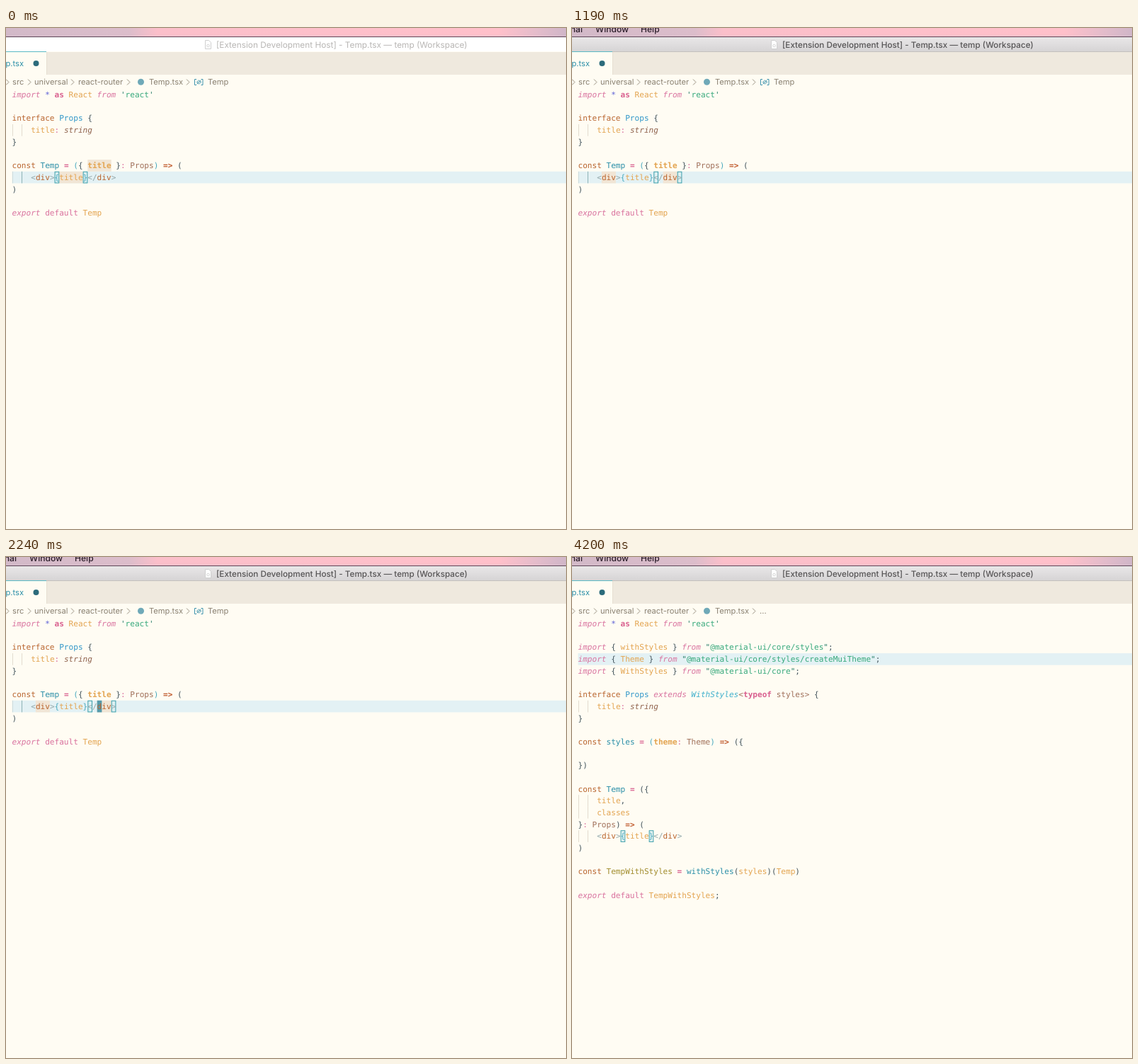
Recreate the animation shown at these times as an HTML page. Size 791 by 708 pixels, loop 4270 ms.

```html
<!DOCTYPE html>
<html lang="en">
<head>
<meta charset="utf-8">
<title>Editor: wrap in withStyles</title>
<style>
  html, body { margin: 0; width: 100%; height: 100%; overflow: hidden; background: #fffcf3; }
  svg { display: block; }
  text { white-space: pre; text-rendering: geometricPrecision; font: 11.15px Inter, "DejaVu Sans", sans-serif; }
  .code { font: 11.09px "DejaVu Sans Mono", monospace; }
  .title { font-size: 11.83px; }
  .active { font-size: 11.73px; font-weight: 500; }
  .menu { font-size: 12.1px; font-weight: 500; fill: #2b1e2a; }
  .crumb { fill: #8a8172; }
  .line { fill: none; stroke-width: 1; }
  .item { fill: #958a7b; font-size: 11.05px; font-weight: 500; }
  .first { fill: #2b7f90; font-size: 11.05px; font-weight: 600; }
  .note { fill: #3f9eab; font-weight: 500; text-anchor: end; }
  .key { fill: #625f57; font-size: 10.3px; font-weight: 500; text-anchor: middle; }
  .k { fill: #d9739f; font-style: italic; }
  .p { fill: #d9608f; font-weight: bold; }
  .P { fill: #d9709c; }
  .v { fill: #5f62d6; }
  .o { fill: #e3a450; }
  .O { fill: #e3a450; font-weight: bold; }
  .g { fill: #37a97c; }
  .q { fill: #2d806c; }
  .c { fill: #b9652f; }
  .b { fill: #3197c9; }
  .t { fill: #2b8fa8; }
  .T { fill: #48a9bf; }
  .d { fill: #43545c; }
  .n { fill: #a0705a; }
  .i { fill: #90634e; font-style: italic; }
  .m { fill: #3fb0cc; font-style: italic; }
  .a { fill: #c05a2c; font-weight: bold; }
  .l { fill: #92a7aa; }
  .y { fill: #a28d2e; }
</style>
</head>
<body>
<svg id="stage" width="791" height="708" viewBox="0 0 791 708"></svg>
<script>
const LOOP = 4270;
const COL = 6.677, ROW = 16.68, LEFT = 8.5, TOP = 86;

// Moments at which the scene changes, in ms
const FOCUS = 135, MOVE = 625, OPEN = 1255, CLOSE = 2235, WRAP = 2655, CRUMB = 3005;
const span = (...ends) => ends.join('-');

const on = (when, body) => `<g data-on="${when}">${body}</g>`;
const rect = (x, y, w, h, fill, more = '') =>
  `<rect x="${x}" y="${y}" width="${w}" height="${h}" fill="${fill}" ${more}/>`;
const esc = s => s.replace(/&/g, '&amp;').replace(/</g, '&lt;').replace(/>/g, '&gt;');
const label = (x, y, s, cls, more = '') =>
  `<text x="${x}" y="${y}" class="${cls}" ${more}>${esc(s)}</text>`;
const path = (d, stroke, more = '') => `<path d="${d}" class="line" stroke="${stroke}" ${more}/>`;

const colX = c => LEFT + c * COL;
const rowY = r => TOP + r * ROW;
const cells = (row, col, n, fill) => rect(colX(col), rowY(row), n * COL, ROW, fill);
const lineBar = row => rect(LEFT, rowY(row), 791, ROW, '#e3f1f4');
const caret = (row, col) => cells(row, col, 1, '#559aaa');
const bracket = (row, col) =>
  rect(colX(col) + .5, rowY(row) + .5, COL - 1, ROW - 1, '#d8eef0', 'fill-opacity=".6" stroke="#3d9fab"');
const guide = (row, col, color = '#e2dccf') => rect(Math.round(colX(col)), rowY(row), 1, ROW, color);
const guides = rows => rows.map(r => guide(r, 0) + guide(r, 2)).join('');

// Each token is a style letter followed by its text
function code(row, src) {
  const indent = src.match(/^ */)[0].length;
  const parts = src.trimStart().split('|').map(s => `<tspan class="${s[0]}">${esc(s.slice(1))}</tspan>`);
  return `<text class="code" x="${colX(indent)}" y="${rowY(row) + 12.1}">${parts.join('')}</text>`;
}
const block = lines => Object.entries(lines).map(([r, s]) => code(+r, s)).join('');

const element = '    l<|cdiv|l>|T{|otitle|T}|l</|cdiv|l>';
const before = {
  2: 'cinterface |bProps |d{',
  3: '    otitle|P: |istring',
  4: 'd}',
  6: 'cconst |tTemp |p= |T(|d{ |Otitle |d}|P: |nProps|T) |a=> |d(',
  7: element,
  8: 'd)',
  10: 'kexport |Pdefault |oTemp'
};
const imp = (name, from) => `kimport |d{ |o${name} |d} |kfrom |q"|g${from}|q"|d;`;
const after = {
  2: imp('withStyles', '@material-ui/core/styles'),
  3: imp('Theme', '@material-ui/core/styles/createMuiTheme'),
  4: imp('WithStyles', '@material-ui/core'),
  6: 'cinterface |bProps |kextends |mWithStyles|n<|ptypeof |nstyles> |d{',
  7: '    otitle|P: |istring',
  8: 'd}',
  10: 'cconst |tstyles |p= |T(|Otheme|P: |nTheme|T) |a=> |d({',
  12: 'd})',
  14: 'cconst |tTemp |p= |d({',
  15: '    otitle|d,',
  16: '    oclasses',
  17: 'd}|P: |nProps|d) |a=> |d(',
  18: element,
  19: 'd)',
  21: 'cconst |yTempWithStyles |p= |twithStyles|d(|ostyles|d)(|oTemp|d)',
  23: 'kexport |Pdefault |oTempWithStyles|d;'
};

function chrome() {
  const doc = path('M281.5 17.5h5l3 3v9h-8z', '#cfcfcf', 'style="fill:#fff"') +
    '<circle cx="285.5" cy="25" r="1.8" class="line" stroke="#d4d4d4"/>';
  const title = (fill, cls) =>
    label(297, 27.8, '[Extension Development Host] - Temp.tsx — temp (Workspace)', cls, `fill="${fill}"`);
  const focused = title('#565455', 'title active');
  const active = span(FOCUS, OPEN) + ',' + span(CLOSE, LOOP);
  return rect(0, 0, 791, 13, 'url(#sky)') +
    on(span(FOCUS, LOOP), label(15, 6.3, 'nal', 'menu', 'text-anchor="end"') +
      label(33, 6.3, 'Window', 'menu') + label(97, 6.3, 'Help', 'menu')) +
    rect(0, 12, 791, 1, '#5e4658') +
    on(span(0, FOCUS), rect(0, 13, 791, 20, '#fff') + doc + title('#b8b6b4', 'title')) +
    on(active, rect(0, 13, 791, 20, 'url(#bar)') + rect(0, 33, 791, 1, '#c4c1bd') + doc + focused) +
    on(span(OPEN, CLOSE), rect(0, 13, 791, 14, '#fcfbf8') + rect(0, 27, 791, 6, '#dad9d6') + doc + focused);
}

function tabs() {
  return on(span(0, OPEN) + ',' + span(CLOSE, LOOP),
      rect(57, 34, 734, 32, '#efe9de') + rect(57, 34, 1, 32, '#e6dfd2')) +
    on(span(OPEN, CLOSE), rect(57, 34, 1, 32, '#d9d4c9')) +
    rect(0, 33, 57, 1, '#5bb9c4') +
    label(25, 54.4, 'p.tsx', 't', 'text-anchor="end"') +
    '<circle cx="42.5" cy="50" r="4" fill="#2c6b7b"/>';
}

function crumbs() {
  const chevrons = [0, 31, 92, 171, 255].map(x => path(`M${x} 72.5l4 4l-4 4`, '#9a9182')).join('');
  const symbol = path('M269 72.5h-2.5v8h2.5M275.5 72.5h2.5v8h-2.5M269.5 76.5l3-2.5l3 2.5l-3 2.5zM269.5 79l6-5', '#3d93ad');
  return chevrons + label(9, 80.3, 'src', 'crumb') + label(40, 80.3, 'universal', 'crumb') +
    label(102, 80.3, 'react-router', 'crumb') +
    '<circle cx="190.5" cy="76.3" r="4.5" fill="#6fa9b8"/>' +
    label(202, 80.3, 'Temp.tsx', 'crumb') +
    on(span(0, CRUMB), symbol + label(285, 80.3, 'Temp', 'crumb')) +
    on(span(CRUMB, LOOP), label(265, 80.3, '...', 'crumb'));
}

function editor() {
  const mark = '#f1e5d5';
  const start = lineBar(7) + cells(6, 16, 5, mark) + cells(7, 10, 5, mark) +
    on(span(FOCUS, MOVE), caret(7, 15)) + bracket(7, 9) + bracket(7, 15);
  const moved = lineBar(7) + cells(7, 5, 3, mark) + cells(7, 18, 3, mark);
  const blink = span(MOVE, MOVE + 500) + ',' + span(CLOSE, WRAP);
  const edit = span(MOVE, OPEN) + ',' + span(CLOSE, WRAP);
  return on(span(0, MOVE), start) +
    on(edit, moved) + on(blink, caret(7, 18)) +
    on(span(MOVE, WRAP), bracket(7, 16) + bracket(7, 21)) +
    on(span(0, OPEN) + ',' + span(CLOSE, WRAP), guides([3]) + guide(7, 0, '#cfdcdc')) +
    on(span(0, WRAP), guide(7, 2, '#8fb3b5') + block(before)) +
    on(span(WRAP, LOOP), lineBar(3) + guides([7, 15, 16, 18]) + bracket(18, 9) + bracket(18, 15) +
      on(span(WRAP, WRAP + 500) + ',' + span(WRAP + 1000, WRAP + 1500), caret(3, 39)) + block(after)) +
    code(0, 'kimport |v* |pas |oReact |kfrom |q\'|greact|q\'');
}

// Command, then its shortcut keys as glyph and centre x
const commands = [
  ['Pebbled UI Treeshapers: Wrap in withStyles'],
  ['Pebbled UI Treeshapers: Box (set up @material-ui/system)'],
  ['Format Document', '⇧', 672, '⌥', 697, 'F', 718.5],
  ['Pond-IDE: Toggle Pondkind coverage'],
  ['Add Missing Imports', '⌃', 676, '⌘', 699.5, 'I', 720],
  ["Shell Command: Install 'code' command in PATH"],
  ['Add Cursor Above', '⌥', 573, '⌘', 597, '↑', 620],
  ['Add Cursor Below', '⌥', 671, '⌘', 694.5, '↓', 718],
  ['Add Cursors To Bottom'],
  ['Add Cursors to Line Ends', '⇧', 675, '⌥', 700, 'I', 720],
  ['Add Cursors To Top'],
  ['Add Line Comment', '⌘', 644, 'K', 667, '⌘', 695, 'C', 718],
  ['Add Selection To Next Find Match', '⌘', 695, 'D', 718],
  ['Add Selection To Previous Find Match'],
  ['Auto Fix...', '⌥', 676, '⌘', 699.5, '.', 721],
  ['Back', '⌃', 698, '-', 719],
  ['Change End of Line Sequence']
];

function palette() {
  let out = [185, 744].map(x => rect(x, 40, 3, 26, '#ddd6ca') + rect(x + 1, 203, 2, 16, '#d5d3cc')).join('') +
    rect(188, 390, 557, 35, '#d9d0c3', 'rx="4"') +
    rect(187.5, 34, 557, 386.5, '#fcfbf6', 'stroke="#d6d2c9"') +
    rect(188, 419.5, 556, 1, '#b9b2a6') +
    label(198, 55.6, '>', 'item') +
    on(span(OPEN, OPEN + 500), rect(206, 44, 1, 14, '#6f6b63')) +
    rect(188, 190, 556, 1, '#62a59f') +
    on(span(1955, CLOSE), rect(734.5, 68, 9.5, 19, '#b3d0d3'));
  commands.forEach(([name, ...keys], i) => {
    const y = 82 + 20.4 * i + (i === 6 ? .8 : 0);
    out += label(198, y, name, i ? 'item' : 'first');
    for (let k = 0; k < keys.length; k += 2) {
      const wide = /[.I-]/.test(keys[k]) ? 7 : 13;
      out += label(keys[k + 1], y - .3, keys[k], 'key') +
        rect(keys[k + 1] - wide / 2, y + 3, wide, 1, '#d2cec5');
    }
  });
  return out + label(727, 82, 'recently used', 'note') + label(727, 205.2, 'other commands', 'note');
}

const stage = document.getElementById('stage');
stage.innerHTML = `<defs>
  <linearGradient id="sky"><stop offset="0" stop-color="#d2b9c8"/><stop offset=".22" stop-color="#dcbdcb"/>
    <stop offset=".27" stop-color="#fbbfca"/><stop offset=".88" stop-color="#ffc0ca"/>
    <stop offset=".95" stop-color="#e3bccb"/><stop offset="1" stop-color="#d0b6c8"/></linearGradient>
  <linearGradient id="bar" x2="0" y2="1"><stop stop-color="#e9e7e8"/><stop offset="1" stop-color="#d6d4d5"/></linearGradient>
  </defs>` + rect(0, 0, 791, 708, '#fffcf3') + on(span(OPEN, CLOSE), rect(0, 0, 791, 708, '#fbfaf5')) +
  chrome() + tabs() + crumbs() + editor() + on(span(OPEN, CLOSE), palette());

const timed = [...stage.querySelectorAll('[data-on]')].map(el =>
  ({ el, spans: el.dataset.on.split(',').map(s => s.split('-').map(Number)) }));

function frame() {
  const t = performance.now() % LOOP;
  for (const { el, spans } of timed)
    el.style.display = spans.some(([a, b]) => t >= a && t < b) ? '' : 'none';
  requestAnimationFrame(frame);
}
frame();
</script>
</body>
</html>
```
